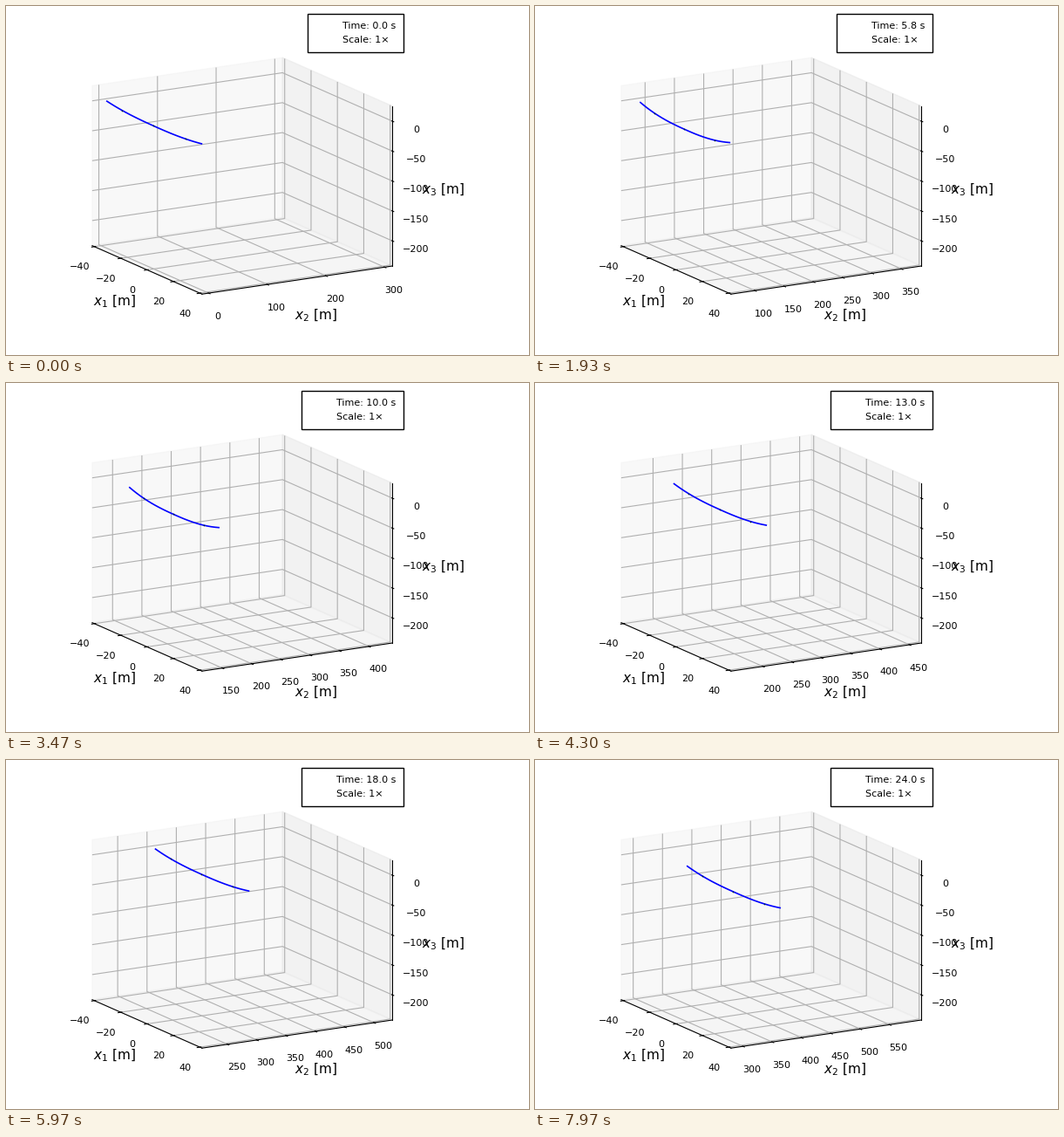
Recreate the animation shown at these times as a matplotlib script. Size 600 by 400 pixels, loop 8000 ms.

```python
import numpy as np
import matplotlib
import matplotlib.pyplot as plt
from matplotlib.animation import FuncAnimation
from matplotlib.collections import LineCollection
from matplotlib.lines import Line2D
from matplotlib.patches import Polygon

matplotlib.rcParams["font.family"] = "DejaVu Sans"

W, H, DPI = 600, 400, 100
FRAMES, INTERVAL = 320, 25
STEPS = 240  # simulation steps of 0.1 s in one loop

# Orthographic box: screen vectors of its three edges from the left corner
CORNER = np.array([98.9, 274.7])
EDGE1 = np.array([126.0, 55.5])
EDGE2 = np.array([218.3, -32.2])
EDGE3 = np.array([0.0, -183.3])
X1_MIN, X1_SPAN = -41.667, 83.333
X2_SPAN = 324.5
Z_MIN, Z_SPAN = -242.0, 267.2
X2_START, SPEED = -11.3, 12.17
MARGIN = X2_SPAN / 50

# Waypoints of the flight: time, x2 within the moving window, height
TIMES = np.array([0, 1.7, 5.8, 10.4, 15.4, 20.3, 23.9])
PLACES = np.array([[11, -3], [11, -3], [14, -9], [45, -27],
                   [97, -15], [85, -4], [97, -35]], float)
SLOPES = np.gradient(PLACES, TIMES, axis=0)
SLOPES[:2] = 0  # level flight at first


def box(a, b, c):
    """Screen point for box fractions a, b, c."""
    return CORNER + a * EDGE1 + b * EDGE2 + c * EDGE3


def frac1(x):
    return (x - X1_MIN) / X1_SPAN


def frac3(z):
    return (z - Z_MIN) / Z_SPAN


def place(t):
    """Cubic Hermite path through the waypoints."""
    i = min(np.searchsorted(TIMES, t, side="right") - 1, len(TIMES) - 2)
    h = TIMES[i + 1] - TIMES[i]
    s = (t - TIMES[i]) / h
    ease = s * s * (3 - 2 * s)
    return (PLACES[i] + (PLACES[i + 1] - PLACES[i]) * ease
            + h * s * (1 - s) * ((1 - s) * SLOPES[i] - s * SLOPES[i + 1]))


def wing(t, s):
    """Screen points of the wing at span positions s in -1..1."""
    u, z = place(t)
    cx, cy = box(0.5, u / X2_SPAN, frac3(z))
    lift = 3.8 + 0.06 * t + 4.8 * np.exp(-((t - 8) / 4) ** 2)
    half = 57.5 - 0.82 * lift
    bend = np.abs(s) ** 2.5
    return cx + s * half + 0.8 * bend, cy + 0.449 * s * half - lift * bend


def x2_ticks(start):
    """Steps of 100 when four of them fit, else steps of 50."""
    lo, hi = start + MARGIN, start + X2_SPAN - MARGIN
    for step, need in ((100, 4), (50, 0)):
        ticks = np.arange(np.ceil(lo / step) * step, hi + 1e-9, step)
        if len(ticks) >= need:
            return ticks


def number(v):
    return f"{v:.0f}".replace("-", "\u2212")


fig = plt.figure(figsize=(W / DPI, H / DPI), dpi=DPI, facecolor="white")
ax = fig.add_axes([0, 0, 1, 1])
ax.set_xlim(0, W)
ax.set_ylim(H, 0)
ax.axis("off")


def pane(corners, shade):
    color = (shade, shade, shade, 0.5)
    ax.add_patch(Polygon([box(*c) for c in corners], fc=color, ec=color, lw=1, zorder=1))


def segments(color, zorder, paths=()):
    lines = LineCollection(paths, colors=color, linewidths=0.8, zorder=zorder)
    ax.add_collection(lines, autolim=False)
    return lines


def label(x, y, text, size=8):
    return ax.text(x, y, text, fontsize=size, ha="center", va="baseline", zorder=5)


pane([(0, 0, 0), (0, 1, 0), (0, 1, 1), (0, 0, 1)], 0.95)
pane([(0, 1, 0), (1, 1, 0), (1, 1, 1), (0, 1, 1)], 0.90)
pane([(0, 0, 0), (1, 0, 0), (1, 1, 0), (0, 1, 0)], 0.925)

OUT, IN = 0.2 / 12, 0.1 / 12
GRID = "#b0b0b0"
grid, marks = [], []
for v in range(-40, 41, 20):
    a = frac1(v)
    grid.append([box(a, 0, 0), box(a, 1, 0), box(a, 1, 1)])
    marks.append([box(a, -OUT, 0), box(a, IN, 0)])
    x, y = box(a, 0, 0)
    label(x - 16.7, y + 26.67, number(v))
for v in range(-200, 1, 50):
    c = frac3(v)
    grid.append([box(0, 0, c), box(0, 1, c), box(1, 1, c)])
    marks.append([box(1 + OUT, 1, c), box(1 - IN, 1, c)])
    x, y = box(1, 1, c)
    label(x + 27.2, y + 12.8, number(v))
segments(GRID, 2, grid)
segments("black", 4, marks)

for p, q in (((0, 0, 0), (1, 0, 0)), ((1, 0, 0), (1, 1, 0)), ((1, 1, 0), (1, 1, 1))):
    ax.add_line(Line2D(*zip(box(*p), box(*q)), color="black", lw=0.8, zorder=3))

for i, (x, y) in enumerate(((125, 343), (356, 359.5), (502, 215)), 1):
    label(x, y, f"$x_{i}$ [m]", 11)

x2_grid = segments(GRID, 2)
x2_marks = segments("black", 4)
x2_labels = [label(0, 0, "") for _ in range(8)]

SPAN = np.linspace(-1, 1, 25)
NODES = np.array([-0.67, 0, 0.67])
wing_line, = ax.plot([], [], color="blue", lw=1.2, zorder=6)
node_dots, = ax.plot([], [], ls="", marker="o", ms=1.2, mew=0, color="#003028", zorder=7)

blank = [Line2D([], [], ls="") for _ in range(2)]
legend = ax.legend(blank, ["Time: 0.0 s", "Scale: 1\u00d7"], loc="upper right",
                   bbox_to_anchor=(456.4, 9.5), bbox_transform=ax.transData,
                   borderaxespad=0, borderpad=0.8, fontsize=8, fancybox=False,
                   framealpha=1, edgecolor="black")
legend.get_frame().set_linewidth(1)


def draw(n):
    t = int(n * STEPS / FRAMES + 0.5) / 10
    start = X2_START + SPEED * t
    ticks = x2_ticks(start)
    fracs = (ticks - start) / X2_SPAN
    x2_grid.set_segments([[box(0, b, 1), box(0, b, 0), box(1, b, 0)] for b in fracs])
    x2_marks.set_segments([[box(1 + OUT, b, 0), box(1 - IN, b, 0)] for b in fracs])
    for text in x2_labels:
        text.set_text("")
    for text, v, b in zip(x2_labels, ticks, fracs):
        x, y = box(1, b, 0)
        text.set_position((x + 10.3, y + 29.5))
        text.set_text(number(abs(v)))
    wing_line.set_data(*wing(t, SPAN))
    node_dots.set_data(*wing(t, NODES))
    # the clock keeps two significant digits
    legend.get_texts()[0].set_text(f"Time: {float(f'{t:.2g}'):.1f} s")
    return ()


anim = FuncAnimation(fig, draw, frames=FRAMES, interval=INTERVAL,
                     repeat=True, repeat_delay=0, blit=False)
plt.show()
```
